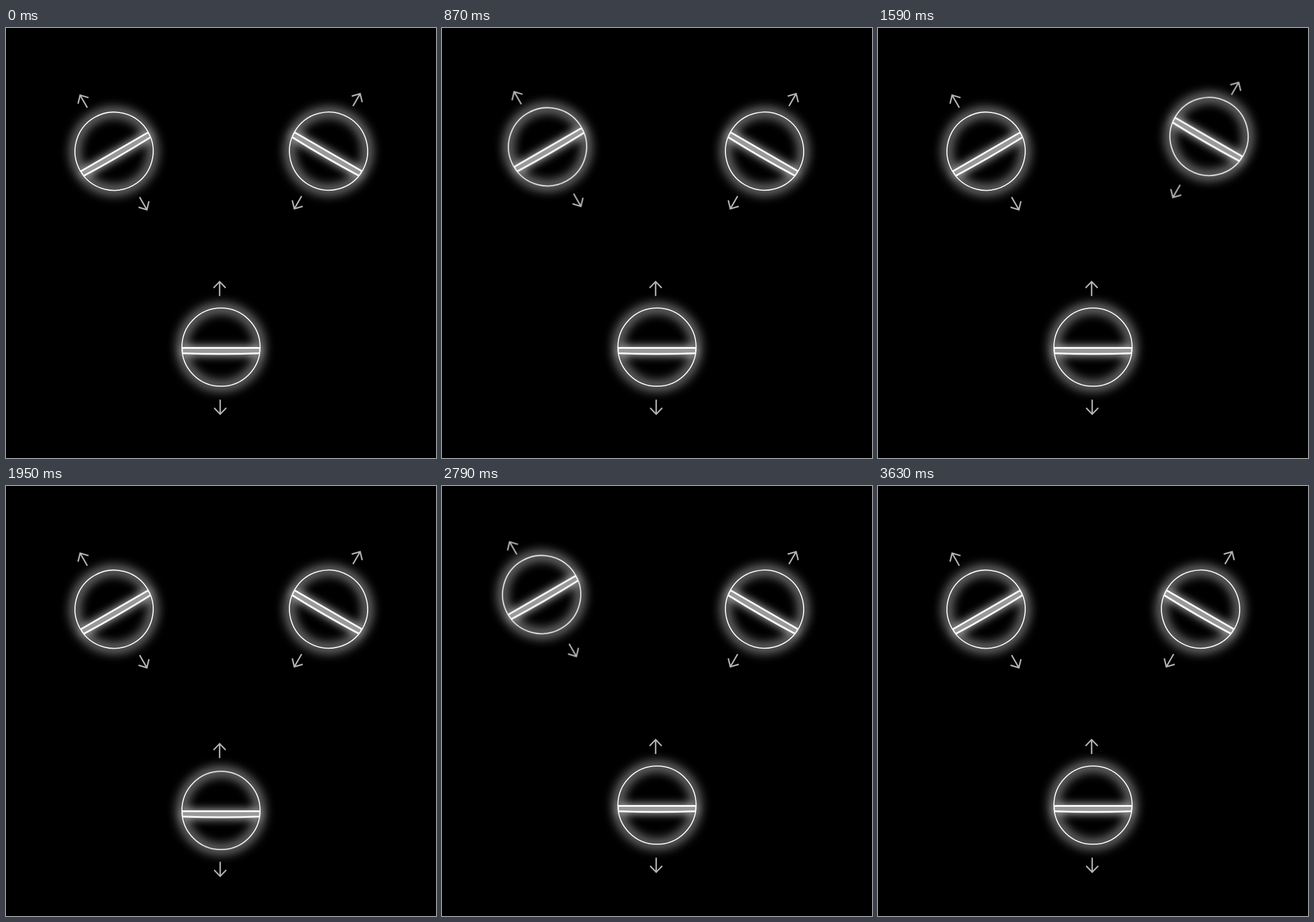
These frames come from a looping animation (748x748 px, 3750 ms). An HTML page with a canvas:

```html
<!DOCTYPE html>
<html lang="en">
<head>
<meta charset="utf-8">
<title>Three ringed planets</title>
<style>
  html, body { margin: 0; width: 100%; height: 100%; overflow: hidden; background: #000; }
  canvas { display: block; }
</style>
</head>
<body>
<canvas id="stage" width="748" height="748"></canvas>
<script>
const SIZE = 748, LOOP = 3750, STEP = 30, RADIUS = 68;
const ARROW_RATIO = 0.77;

// Each planet nudges along its own tilted axis; starts are in steps.
const planets = [
  { x: 374, y: 555.2, tilt: 0, starts: [1, 62] },
  { x: 188, y: 214.4, tilt: -Math.PI / 6, starts: [20, 81] },
  { x: 561.1, y: 214.2, tilt: Math.PI / 6, starts: [41, 102] },
];

// [step, offset along the axis], eased between neighbours
const track = [[-0.88, 0], [7.1, 20], [10.7, -30], [18.75, 0]];

const ease = t => t < 0.5 ? 4 * t ** 3 : 1 - 4 * (1 - t) ** 3;

function offsetAt(step) {
  if (step <= 0 || step >= 19) return 0;
  for (let i = 1; i < track.length; i++) {
    const [a, from] = track[i - 1], [b, to] = track[i];
    if (step < b) return from + (to - from) * ease((step - a) / (b - a));
  }
  return 0;
}

function sprite({ x, y, tilt }, draw) {
  const layer = document.createElement('canvas');
  layer.width = layer.height = SIZE;
  const c = layer.getContext('2d');
  c.translate(x, y);
  c.rotate(tilt);
  draw(c);
  return layer;
}

function circle(c) {
  c.beginPath();
  c.arc(0, 0, RADIUS, 0, Math.PI * 2);
}

function drawPlanet(c) {
  // glow
  c.strokeStyle = c.fillStyle = '#fff';
  c.filter = 'blur(10px)';
  c.lineWidth = 8;
  circle(c);
  c.stroke();
  c.filter = 'blur(8px)';
  c.globalAlpha = 0.75;
  c.fillRect(-66, -1, 132, 15);
  c.filter = 'none';
  c.globalAlpha = 1;

  // ring band, cut off by the disc
  c.save();
  circle(c);
  c.clip();
  c.beginPath();
  c.moveTo(-RADIUS, 1.2);
  c.lineTo(RADIUS, 1.2);
  c.lineTo(RADIUS, 10.6);
  c.quadraticCurveTo(0, 13, -RADIUS, 10.6);
  c.closePath();
  c.fillStyle = '#999';
  c.fill();
  c.lineWidth = 3;
  c.stroke();
  c.restore();

  c.lineWidth = 1.8;
  circle(c);
  c.stroke();
}

function drawArrow(c, x, tail, tip) {
  const back = tip + 11 * Math.sign(tail - tip);
  c.beginPath();
  c.moveTo(x, tail);
  c.lineTo(x, tip);
  c.moveTo(x - 10.5, back);
  c.lineTo(x, tip);
  c.lineTo(x + 10.5, back);
  c.stroke();
}

function drawArrows(c) {
  c.strokeStyle = '#b3b3b3';
  c.lineWidth = 2.5;
  drawArrow(c, -2.4, -89, -114);
  drawArrow(c, -1.4, 91.2, 116.6);
}

for (const p of planets) {
  p.body = sprite(p, drawPlanet);
  p.arrows = sprite(p, drawArrows);
}

const ctx = document.getElementById('stage').getContext('2d');

function render(ms) {
  const step = Math.floor((ms % LOOP) / STEP);
  ctx.fillStyle = '#000';
  ctx.fillRect(0, 0, SIZE, SIZE);
  for (const p of planets) {
    const d = p.starts.reduce((sum, s) => sum + offsetAt(step - s), 0);
    const dx = -Math.sin(p.tilt) * d, dy = Math.cos(p.tilt) * d;
    ctx.drawImage(p.body, dx, dy);
    ctx.drawImage(p.arrows, dx * ARROW_RATIO, dy * ARROW_RATIO);
  }
}

const begin = performance.now();
function tick() {
  render(performance.now() - begin);
  requestAnimationFrame(tick);
}
tick();
</script>
</body>
</html>
```
